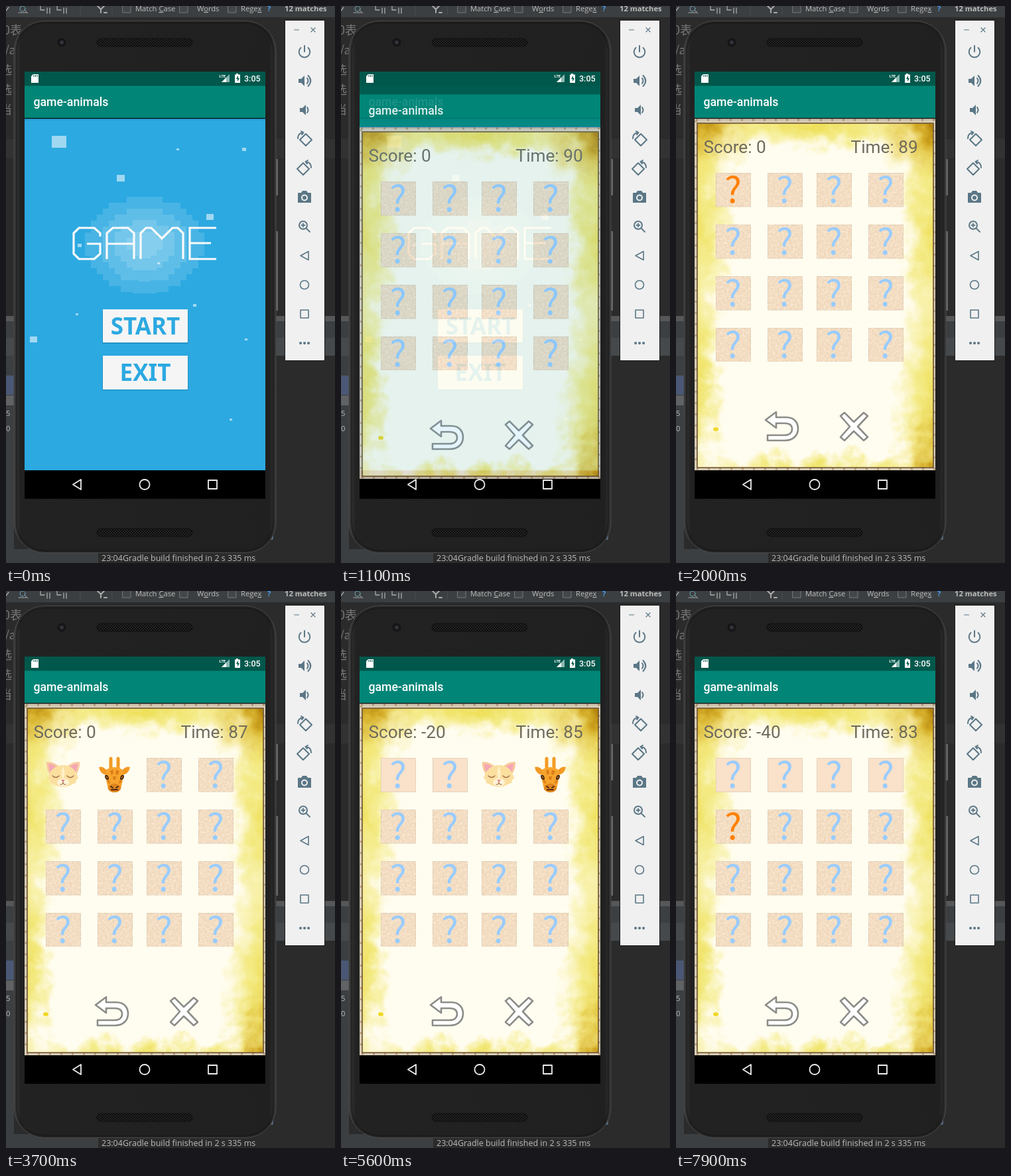
Write an HTML page that moves like this. It is 496 px wide and 841 px high and loops after 8000 ms.

```html
<!DOCTYPE html>
<html lang="en">
<head>
<meta charset="utf-8">
<title>Memory game in a phone emulator</title>
<style>
  html, body { margin: 0; width: 100%; height: 100%; overflow: hidden; background: #2b2b2b; }
  svg { display: block; }
  text { white-space: pre; }
  .ide { font: 11.200px "Open Sans", sans-serif; fill: #bbb; }
  .status { font-size: 12.500px; }
  .cjk { font: 18px "Noto Sans CJK SC", "Noto Sans CJK", sans-serif; fill: #777; }
  .bar { font: 500 17.700px Roboto, sans-serif; fill: #fff; }
  .info { font: 26.200px Roboto, sans-serif; fill: #6f6b5c; }
  .button { font: 900 35px "Noto Sans", sans-serif; fill: #2ca9e1; text-anchor: middle; }
  .mark { font: 54px "Noto Sans CJK SC", "Noto Sans CJK", sans-serif; text-anchor: middle; }
  .line { fill: none; stroke-linecap: round; stroke-linejoin: round; }
</style>
</head>
<body>
<svg width="496" height="841" viewBox="0 0 496 841">
  <defs>
    <clipPath id="screen"><rect x="28" y="99" width="363" height="645"/></clipPath>
    <clipPath id="sheet"><rect x="32" y="177" width="356" height="520"/></clipPath>
    <linearGradient id="shell" x2="1" y2="0">
      <stop stop-color="#3b3b3b"/><stop offset=".025" stop-color="#222"/>
      <stop offset=".975" stop-color="#202020"/><stop offset="1" stop-color="#333"/>
    </linearGradient>
    <linearGradient id="shadow" x2="0" y2="1">
      <stop stop-opacity=".3"/><stop offset="1" stop-opacity="0"/>
    </linearGradient>
    <radialGradient id="yellow">
      <stop stop-color="#eedf55"/><stop offset=".45" stop-color="#f3e97e" stop-opacity=".9"/>
      <stop offset=".75" stop-color="#f8f0a8" stop-opacity=".6"/><stop offset="1" stop-color="#fdf8d8" stop-opacity="0"/>
    </radialGradient>
    <radialGradient id="gold">
      <stop stop-color="#a87400"/><stop offset=".3" stop-color="#d0a414" stop-opacity=".85"/>
      <stop offset=".65" stop-color="#e8d048" stop-opacity=".5"/><stop offset="1" stop-color="#f3e670" stop-opacity="0"/>
    </radialGradient>
    <filter id="rough" x="-10%" y="-10%" width="120%" height="120%" color-interpolation-filters="sRGB">
      <feTurbulence type="fractalNoise" baseFrequency=".035" numOctaves="5" seed="4"/>
      <feDisplacementMap in="SourceGraphic" scale="50" xChannelSelector="R" yChannelSelector="G"/>
    </filter>
    <filter id="grain" x="0" y="0" width="1" height="1" color-interpolation-filters="sRGB">
      <feTurbulence type="fractalNoise" baseFrequency=".3" numOctaves="2"/>
      <feColorMatrix values="0 0 0 0 1  0 0 0 0 .95  0 0 0 0 .87  1.400 0 0 0 -.500"/>
      <feComposite in2="SourceGraphic" operator="atop"/>
    </filter>
    <pattern id="mesh" width="4" height="4" patternUnits="userSpaceOnUse">
      <rect width="4" height="4" fill="#0c0c0c"/><path d="M0 0h2v2h-2zM2 2h2v2h-2z" fill="#252525"/>
    </pattern>

    <g id="cat">
      <path d="M2 7Q13 6 22 15L11 31Q1 20 2 7ZM52 7Q41 6 32 15L43 31Q53 20 52 7Z" fill="#f8c99c"/>
      <path d="M5 10Q13 10 19 17L11 27Q5 19 5 10ZM49 10Q41 10 35 17L43 27Q49 19 49 10Z" fill="#f5a7b4"/>
      <path d="M27 12C39 12 47 19 50 32L46 35 47 38C41 41 34 45 27 45S13 41 7 38L8 35 4 32C7 19 15 12 27 12Z" fill="#fbdf9f"/>
      <path d="M27 13Q22 25 27 34 32 25 27 13Z" fill="#fff0c8"/>
      <ellipse cx="27" cy="38" rx="9" ry="6" fill="#fff3d8"/>
      <path d="M11 28Q16 33 21 28M33 28Q38 33 43 28M27 36V39M23 41Q25 42 27 39 29 42 31 41" class="line" stroke="#9c6a43" stroke-width="1.2"/>
      <path d="M24 34H30L27 37Z" fill="#e77c88"/>
    </g>
    <g id="giraffe">
      <path d="M21 18V2M32 18V2" class="line" stroke="#f39b25" stroke-width="5"/>
      <path d="M15 20Q9 13 3 15 5 26 16 27ZM38 20Q44 13 50 15 48 26 37 27Z" fill="#f29a24"/>
      <path d="M14 19Q26 11 39 19L40 30 36 48Q33 53 26.500 53T17 48L13 30Z" fill="#f7a42d"/>
      <path d="M20 21l4-3 1 6-3 3zM29 19l5 2-3 6-3-2zM24 29h5l-1 5h-3zM15 34l4 1 1 5-3-1zM38 34l-4 1-1 5 3-1z" fill="#dc7d18"/>
      <path d="M18 43Q26 36 35 43L36 48Q33 53 26.500 53T17 48Z" fill="#df841d"/>
      <path d="M13 28q4-1 4 5-4 0-4-5M40 28q-4-1-4 5 4 0 4-5M21 44l3 2M32 44l-3 2M22 49h9" class="line" stroke="#4d2a12" stroke-width="2"/>
    </g>
  </defs>

  <!-- editor behind the emulator -->
  <rect width="496" height="841" fill="#2b2b2b"/>
  <rect width="496" height="17" fill="#3c3f41"/>
  <path d="M0 201H496V230H0Z" fill="#323232"/>
  <path d="M0 468H496V476H0Z" fill="#555759"/>
  <path d="M0 476H496V501H0ZM0 528H12V841H0ZM0 820H139V841H0Z" fill="#3c3f41"/>
  <path d="M0 501H496V528H0Z" fill="#45494c"/>
  <path d="M0 558H14V587H0Z" fill="#4a5875"/><path d="M0 588H14V603H0Z" fill="#606264"/>
  <g class="line" stroke="#aaa">
    <path d="M0 7 4 2M52 0V6H58M62 3V11M66 3V11M77 0V6H83M87 3V11M91 3V11" stroke-width="1.300"/>
    <circle cx="25" cy="4" r="4" stroke="#6aa0b5"/><path d="M19 10H31M28 6 33 11"/>
    <path d="M138 0 143 5V10M148 0 143 5M148 10h4" stroke-width="2"/>
    <path d="M112 0V13M160 0V13" stroke="#4b4e50"/>
    <path d="M176-2h12v12h-12zM262-2h12v12h-12zM335-2h12v12h-12z" stroke="#777" fill="#43474a"/>
  </g>
  <g class="ide">
    <text x="195" y="8">Match <tspan text-decoration="underline">C</tspan>ase</text>
    <text x="288" y="8">W<tspan text-decoration="underline">o</tspan>rds</text>
    <text x="354" y="8">Rege<tspan text-decoration="underline">x</tspan></text>
    <text x="394" y="8" style="fill:#4a9cf0;font-weight:700">?</text>
    <text x="420" y="8" style="font-weight:700">12 matches</text>
    <text x="0" y="619">5</text><text x="0" y="642">0</text>
    <text class="status" x="144" y="838">23:04</text>
    <text class="status" x="176" y="838">Gradle build finished in 2 s 335 ms</text>
  </g>
  <g class="cjk">
    <text x="-4" y="43">0表</text><text x="-2" y="73">/a</text><text x="-9" y="103">选</text>
    <text x="-9" y="133">选</text><text x="-9" y="163">当</text>
  </g>
  <path d="M398 805H402V797" class="line" stroke="#7d9ccf"/>

  <!-- phone -->
  <path d="M407 231h3v55h-3zM407 340h3v120h-3z" fill="#666"/>
  <rect x="12" y="22.500" width="395" height="803" rx="46" fill="url(#shell)" stroke="#4b4b4b"/>
  <rect x="16" y="26" width="387" height="796" rx="42" fill="none" stroke="#161616"/>
  <circle cx="84" cy="55" r="6.500" fill="#151515"/><circle cx="84" cy="55" r="3" fill="#30343a"/>
  <rect x="137" y="49" width="144" height="12" rx="6" fill="url(#mesh)" stroke="#111"/>
  <rect x="137" y="789" width="144" height="12" rx="6" fill="url(#mesh)" stroke="#111"/>

  <g clip-path="url(#screen)">
    <rect x="28" y="99" width="363" height="645"/>
    <g id="menu">
      <rect x="28" y="170" width="363" height="531" fill="#2ca9e1"/>
      <g id="halo" fill="#fff" fill-opacity=".13"></g>
      <path id="flakes" fill="#fff" fill-opacity=".55"/>
      <path d="M142 348V343L133 335H110L102 343V374L110 382H133L142 374V359H122M152 382V343L161 335H184L193 343V382M152 359H193M203 382V343L211 335H219L235 351 251 335H259L267 343V382M317 335H277V382H317M277 358H309" fill="none" stroke="#fafafa" stroke-width="3.200"/>
      <path d="M145 460h130v50h-130zM145 530h130v50.500h-130z" fill="#146a91" opacity=".35"/>
      <path id="startBox" d="M146 458H274V508H146Z" fill="#f5f5f5"/>
      <path d="M146 528H274V579H146Z" fill="#f5f5f5"/>
      <text class="button" x="210" y="496">START</text>
      <text class="button" x="210" y="566">EXIT</text>
      <g id="header">
        <path d="M28 99H391V121H28Z" fill="#00574b"/>
        <path d="M28 120.500H391V169H28Z" fill="#008577"/>
        <path d="M28 169H391V173H28Z" fill="url(#shadow)"/>
        <text class="bar" x="41.500" y="151">game-animals</text>
      </g>
    </g>
    <g id="game">
      <path d="M28 170H391V701H28Z" fill="#d8ccb6"/>
      <path d="M30 172H389V699H30Z" fill="none" stroke="#9b6f4c" stroke-opacity=".55" stroke-width="3" stroke-dasharray="3 14"/>
      <g clip-path="url(#sheet)">
        <rect x="32" y="177" width="356" height="520" fill="#fffdf0"/>
        <g filter="url(#rough)">
          <g fill="url(#yellow)">
            <ellipse cx="22" cy="320" rx="70" ry="230"/>
            <ellipse cx="24" cy="560" rx="48" ry="200"/>
            <ellipse cx="394" cy="330" rx="60" ry="250"/>
            <ellipse cx="398" cy="590" rx="72" ry="190"/>
            <ellipse cx="210" cy="172" rx="220" ry="48"/>
            <ellipse cx="220" cy="708" rx="230" ry="34"/>
          </g>
          <g fill="url(#gold)">
            <ellipse cx="26" cy="170" rx="95" ry="95"/>
            <ellipse cx="396" cy="174" rx="105" ry="105"/>
            <ellipse cx="400" cy="690" rx="62" ry="135"/>
          </g>
        </g>
        <ellipse cx="60" cy="639" rx="4" ry="3" fill="#f0d828"/>
      </g>
      <rect x="32" y="177" width="356" height="520" fill="none" stroke="#6e5533" stroke-width="1.600"/>
      <text class="info" id="score" x="41.500" y="222"></text>
      <text class="info" id="clock" x="263.500" y="222"></text>
      <g id="tiles" filter="url(#grain)"></g>
      <g id="faces"></g>
      <path d="M135 625L151 613V621H166C180 621 184 631 184 638 184 648 177 656 164 656H138V648H163C171 648 175 644 175 639 175 633 171 630 164 630H151V637Z" class="line" style="fill:#fff" stroke="#8c8c88" stroke-width="2.600"/>
      <path d="M248 619L254 614 268 628 283 614 289 619 274 635 289 651 283 656 268 642 254 656 248 651 262 635Z" class="line" style="fill:#fff" stroke="#8c8c88" stroke-width="2.600"/>
      <use href="#header"/>
    </g>

    <!-- system bars -->
    <path d="M41 103H49V116H38V106Z" fill="#fff"/><path d="M42 104v3M44.500 104v3M47 104v3" stroke="#00574b"/>
    <text x="321.500" y="108" style="font:700 6px Roboto,sans-serif" fill="#fff">LTE</text>
    <path d="M337 103V115H325Z" fill="#8db9b2"/><path d="M332 108V115H325Z" fill="#fff"/>
    <path d="M347 102h3v1.500h3V116h-8V103.500h2z" fill="#fff"/><path d="M350 105l-3 5h2v4l3-5h-2z" fill="#00574b"/>
    <text x="359" y="114" style="font:500 12.500px Roboto,sans-serif" fill="#fff">3:05</text>
    <g class="line" stroke="#eee" stroke-width="1.800">
      <path d="M101 722.500 113 715V730ZM305 716H318V729H305Z"/><circle cx="209" cy="722.500" r="7.500"/>
    </g>
  </g>

  <!-- emulator toolbar -->
  <rect x="420.500" y="21.500" width="60" height="514" fill="#f0f0f0" stroke="#181818"/>
  <g class="line" stroke="#5b7786" stroke-width="2">
    <path d="M434.500 36h7M460 33l6 6M466 33l-6 6" stroke-width="1.200"/>
    <path d="M450 60V69M444.500 63A8.300 8.300 0 1 0 455.500 63"/>
    <path d="M454 109Q457 113 454 117M455.500 105Q463 113 455.500 121M454 153Q457 157 454 161"/>
    <path d="M441 110h4l5-5v16l-5-5h-4zM443 154h4l5-5v16l-5-5h-4z" fill="#5b7786" stroke="none"/>
    <g id="turn"><path d="M452 193 461 202 452 211 443 202ZM440 200Q440 192 448 191M445 189 448.500 191 446 194"/></g>
    <use href="#turn" transform="translate(900 44) scale(-1 1)"/>
    <path d="M441 282h4l2-3h6l2 3h4q1 0 1 1v14h-20v-14q0-1 1-1z" fill="#5b7786" stroke="none"/>
    <circle cx="450" cy="289.500" r="4" stroke="#f0f0f0"/>
    <circle cx="448" cy="331" r="6"/><path d="M453 336 458 341M445.500 331h5M448 328.500v5" stroke-width="1.800"/>
    <g stroke-width="1.600"><path d="M444 377 456 370.500V383.500ZM444 459H456V471H444Z"/><circle cx="450" cy="421" r="6.500"/></g>
    <path d="M444 509h.1M450 509h.1M456 509h.1" stroke-width="4"/>
  </g>
</svg>
<script>
const $ = id => document.getElementById(id);
const add = (parent, tag, attrs) => {
  const el = document.createElementNS("http://www.w3.org/2000/svg", tag);
  for (const key in attrs) el.setAttribute(key, attrs[key]);
  return parent.appendChild(el);
};
const show = (el, on) => el.style.display = on ? "" : "none";

// Stepped ellipses make the blocky glow
for (const [rx, ry] of [[88, 73], [67, 55], [47, 38], [27, 20]]) {
  let d = "";
  for (let y = -ry; y < ry; y += 9) {
    const h = Math.min(9, ry - y), mid = (y + h / 2) / ry;
    const w = Math.round(rx * Math.sqrt(1 - mid * mid) / 9) * 9;
    d += `M${209 - w} ${361 + y}h${2 * w}v${h}h${-2 * w}z`;
  }
  add($("halo"), "path", { d });
}
const flakes = [[69, 196, 22], [167, 255, 12], [257, 215, 4], [356, 214, 6], [302, 314, 11], [108, 359, 6],
  [228, 387, 4], [282, 450, 5], [105, 464, 4], [36, 499, 11], [360, 502, 4], [337, 623, 4]];
$("flakes").setAttribute("d", flakes.map(([x, y, w]) => {
  const h = Math.round(w * .8);
  return `M${x} ${y}h${w}v${h}h${-w}z`;
}).join(""));

const cards = [];
for (let i = 0; i < 16; i++) {
  const x = [60, 138, 212, 290][i % 4], y = 252 + 78 * (i >> 2);
  const box = { x: x + .5, y: y + .5, width: 52, height: 50.5 };
  const tile = add($("tiles"), "rect", { ...box, fill: "#f0d8bc", stroke: "#dcc9b0" });
  const worn = add($("faces"), "rect", { ...box, fill: "#f9e1ca", stroke: "#e6d2bc" });
  const mark = add($("faces"), "text", { x: x + 26, y: y + 45, class: "mark" });
  mark.textContent = "?";
  const animal = add($("faces"), "use", { href: i % 2 ? "#giraffe" : "#cat", x: x - 1, y: y - 1 });
  cards.push({ tile, worn, mark, animal });
}

// Per card: [pressed, opened, closed] in ms
const turns = { 0: [2000, 2300, 4700], 1: [2300, 2300, 4700], 2: [4900, 5100, 7400], 3: [5100, 5100, 7400], 4: [7900, 8000, 8000] };
const ticks = [2000, 2800, 3700, 4700, 5600, 6500, 7400];
const misses = [4700, 7400];
const passed = (times, t) => times.filter(at => t >= at).length;

function draw(t) {
  show($("game"), t >= 1100);
  $("game").setAttribute("transform", `translate(0 ${t < 1200 ? 13 : t < 1300 ? 1 : 0})`);
  $("game").setAttribute("opacity", t < 1200 ? .88 : 1);
  $("startBox").setAttribute("fill", t >= 900 && t < 1100 ? "#dedede" : "#f5f5f5");
  $("score").textContent = "Score: " + -20 * passed(misses, t);
  $("clock").textContent = "Time: " + (90 - passed(ticks, t));
  cards.forEach(({ tile, worn, mark, animal }, i) => {
    const [pressed, opened, closed] = turns[i] || [9e3, 9e3, 9e3];
    const open = t >= opened && t < closed;
    show(tile, !open);
    show(worn, t >= closed);
    show(mark, !open);
    show(animal, open);
    mark.setAttribute("fill", t >= pressed && t < opened ? "#ff8000" : "#99ccff");
  });
}

let last = -1;
function loop() {
  const t = Math.floor(performance.now() % 8000 / 100) * 100;
  if (t !== last) draw(last = t);
  requestAnimationFrame(loop);
}
loop();
</script>
</body>
</html>
```
